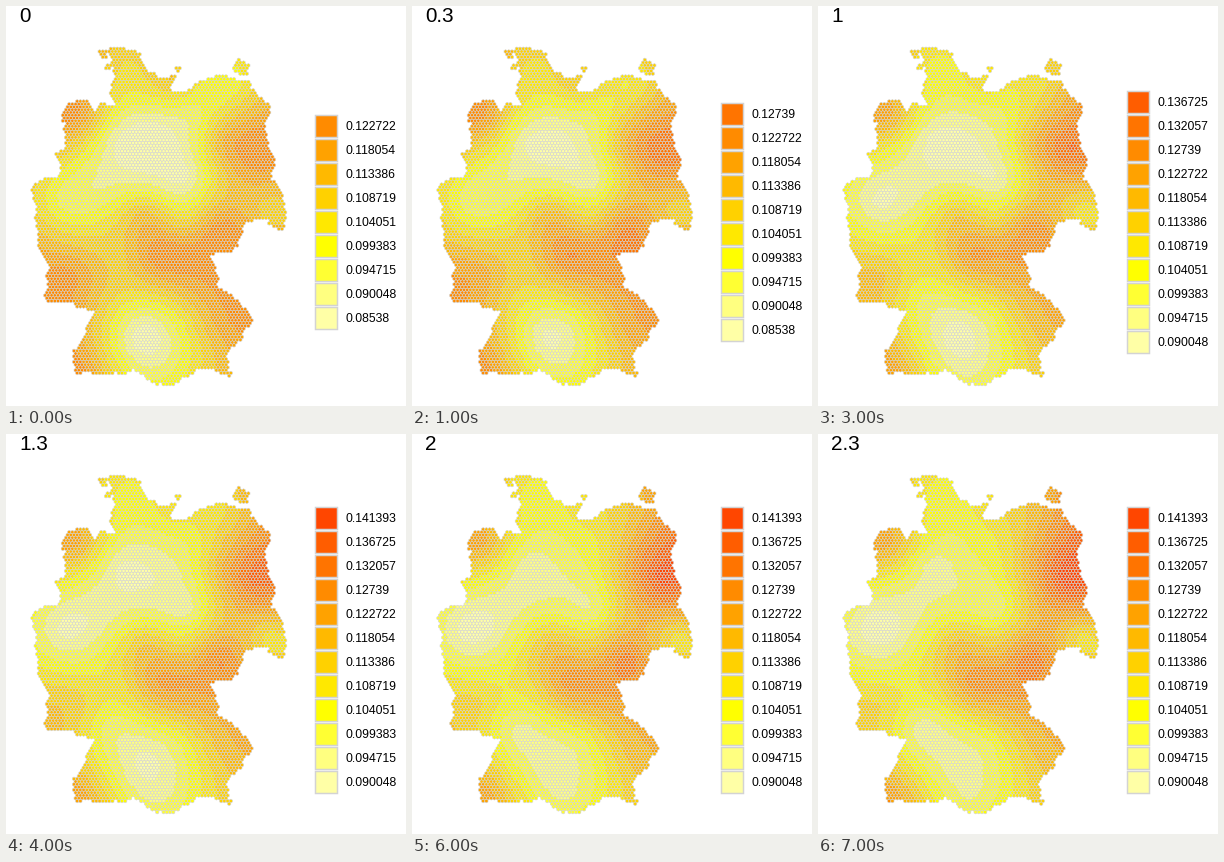
Animation, 400 px wide and 400 px high, one loop 8000 ms. Source, as a matplotlib script:

```python
import numpy as np
import matplotlib.pyplot as plt
from matplotlib.animation import FuncAnimation
from matplotlib.collections import PolyCollection
from matplotlib.path import Path
from matplotlib.patches import Rectangle

SIZE, DPI = 400, 100
PX = 72 / DPI
GREY = "#d3d3d3"
LOW, STEP = 0.08538, 0.00466773
PITCH = 3.2  # hexagon width
ROW = PITCH * np.sqrt(3) / 2
rng = np.random.default_rng(4)

# Corners of the border, clockwise from the northern tip
border = [(103, 44), (131, 47), (139, 66), (169, 70), (162, 89), (176, 87),
          (203, 72), (238, 76), (257, 95), (262, 110), (256, 123), (268, 150),
          (272, 183), (279, 207), (276, 222), (261, 212), (235, 230),
          (205, 248), (199, 244), (206, 258), (210, 279), (245, 317),
          (219, 347), (225, 370), (205, 361), (182, 369), (149, 377),
          (128, 362), (100, 366), (72, 368), (77, 335), (91, 304), (50, 296),
          (39, 289), (44, 263), (33, 240), (27, 212), (33, 202), (26, 185),
          (33, 177), (57, 168), (50, 147), (61, 143), (65, 116), (58, 115),
          (62, 98), (83, 97), (87, 110), (96, 97), (112, 100), (106, 86),
          (110, 71)]
islands = [(97, 47, 3), (102, 61, 2), (172, 63, 2), (235, 62, 7)]  # x, y, r

# Warm and cool spots: x, y, level at the start and at the end
spots = np.array([
    (73, 112, 7.4, 7.5), (120, 58, 4.4, 4), (165, 78, 5.3, 4.8),
    (220, 78, 2.6, 7.2), (250, 145, 8.6, 12.3), (215, 135, 6.2, 8),
    (188, 110, 2, 5), (145, 130, -.6, 3), (115, 132, .2, 2.1),
    (181, 175, .5, 3), (265, 205, 5, 5.2), (215, 224, 8.3, 10),
    (178, 215, 4.6, 6.8), (60, 195, 2, .6), (97, 190, 1.8, 2.4),
    (138, 208, 5.8, 6.6), (155, 250, 8.4, 8.9), (118, 250, 5.4, 5.4),
    (68, 268, 7.6, 5.3), (105, 295, 4.6, 2), (138, 330, -.3, 2),
    (170, 308, 3.5, 3.4), (218, 318, 7.2, 6.8), (150, 365, 1.8, 2.5),
    (78, 362, 7.6, 8)])


def roughen(shape, passes=3, amount=0.11):
    """Shift the middle of every edge sideways at random, repeatedly."""
    z = np.array([complex(*p) for p in shape])
    for _ in range(passes):
        edge = np.roll(z, -1) - z
        middle = z + edge * (0.5 + 1j * rng.normal(0, amount, len(z)))
        z = np.column_stack([z, middle]).ravel()
    return Path(np.column_stack([z.real, z.imag]))


angles = np.pi / 6 + np.arange(6) * np.pi / 3
cell = PITCH / np.sqrt(3) * np.column_stack([np.cos(angles), np.sin(angles)])


def hex_centres():
    """Centres of all cells that touch the land."""
    pts = np.array([(x + PITCH / 2 * (r % 2), y)
                    for r, y in enumerate(np.arange(40, 382, ROW))
                    for x in np.arange(20, 286, PITCH)])
    land = [roughen(border)]
    for x, y, r in islands:
        ring = [(x + r * np.cos(a), y + r * np.sin(a)) for a in angles]
        land.append(roughen(ring, 2, 0.3))
    touching = [area.contains_points(pts + corner)
                for area in land for corner in 0.8 * cell]
    return pts[np.any(touching, axis=0)]


def kernel(p, q):
    gap = p[:, None] - q[None]
    return np.sqrt((gap ** 2).sum(axis=2) + 12 ** 2)


centres = hex_centres()
sites = spots[:, :2]
first, last = (kernel(centres, sites)
               @ np.linalg.solve(kernel(sites, sites), spots[:, 2:])).T


def heat(k):
    """Pale yellow to yellow, then on to red."""
    if k < 3:
        return (1, 1, (0.65, 0.5, 0.2)[k])
    return (1, 1 - (k - 3) / 11, 0)


palette = np.array([heat(k) for k in range(12)])

fig = plt.figure(figsize=(SIZE / DPI, SIZE / DPI), dpi=DPI, facecolor="white")
ax = fig.add_axes([0, 0, 1, 1])
ax.set(xlim=(0, SIZE), ylim=(SIZE, 0))
ax.axis("off")

cells = PolyCollection(centres[:, None] + cell, edgecolors=GREY,
                       linewidths=0.6 * PX)
ax.add_collection(cells)

title = ax.text(13.2, 15.5, "", family="Liberation Sans", size=20.8 * PX)
keys, labels = [], []
for _ in palette:
    keys.append(ax.add_patch(Rectangle((308.5, 0), 22, 22, ec=GREY,
                                       lw=1.48 * PX)))
    labels.append(ax.text(339, 0, "", family="Liberation Sans", size=12.2 * PX))


def draw(i):
    t = i / 3
    base = int(i >= 2)
    count = min(9 + i - base, 12)
    title.set_text(f"{round(t, 1):g}")

    progress = (i / 7) ** 0.8
    level = first + (last - first) * progress
    bands = np.rint(level).astype(int) - base
    cells.set_facecolors(palette[np.clip(bands, 0, count - 1)])

    for k, (key, label) in enumerate(zip(keys, labels)):
        y = 215.5 + 12 * (count - 1) - 24 * k
        key.set(y=y - 11, facecolor=palette[k], visible=k < count)
        label.set(y=y + 4.3, visible=k < count,
                  text=str(round(LOW + STEP * (k + base), 6)))
    return [cells, title, *keys, *labels]


anim = FuncAnimation(fig, draw, frames=8, interval=1000, repeat=True,
                     repeat_delay=0)
plt.show()
```
